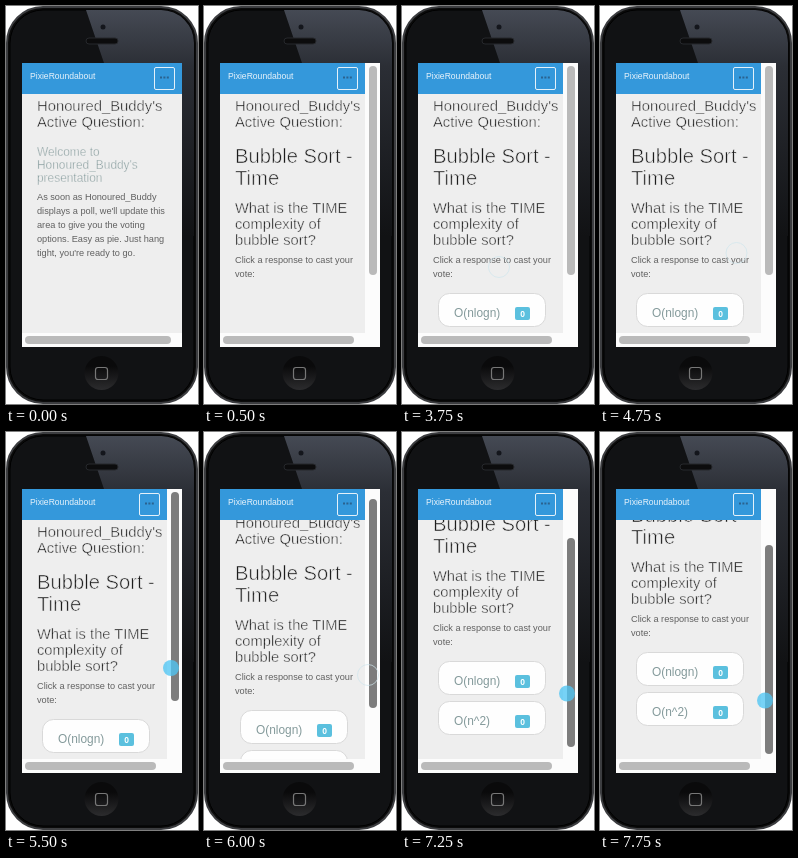
Animation, 192 px wide and 398 px high, one loop 8000 ms. Source, as an HTML page:

```html
<!DOCTYPE html>
<html lang="en">
<head>
<meta charset="utf-8">
<title>Phone poll</title>
<style>
  html, body { margin: 0; width: 100%; height: 100%; overflow: hidden; background: #fff; }
  svg { display: block; }
  text { font-family: "Liberation Sans", Arial, sans-serif; fill: #1c1c1c; white-space: pre; }
  /* a thin outline in the paper colour makes the letters light */
  .thin { stroke: #eee; stroke-width: .033em; }
  .soft { fill: #849a9b; }
  .body { fill: #606060; }
</style>
</head>
<body>
<svg width="192" height="398" viewBox="0 0 192 398">
  <defs>
    <linearGradient id="sheen" x1="0" y1="0" x2="0" y2="1">
      <stop offset="0" stop-color="#454a54"/>
      <stop offset=".25" stop-color="#2b2e35"/>
      <stop offset="1" stop-color="#111214"/>
    </linearGradient>
    <linearGradient id="button" x1="0" y1="0" x2="0" y2="1">
      <stop offset=".3" stop-color="#0a0a0b"/>
      <stop offset="1" stop-color="#2c2c2e"/>
    </linearGradient>
    <clipPath id="shell"><rect x="4" y="4" width="184" height="390" rx="33"/></clipPath>
    <clipPath id="view"><rect id="viewBox" x="16" y="88" height="239"/></clipPath>
  </defs>

  <rect x="1" y="1" width="190" height="396" rx="36" fill="#0b0b0b" stroke="#3c3d40" stroke-width="2"/>
  <rect x="4" y="4" width="184" height="390" rx="33" fill="#111214" stroke="#000"/>
  <path d="M80 4H188V230H140L98 57Z" fill="url(#sheen)" clip-path="url(#shell)"/>
  <rect x="80" y="32" width="32" height="6" rx="3" fill="#0c0c0d" stroke="#26282c"/>
  <circle cx="97" cy="21" r="2.5" fill="#14161c"/>
  <circle cx="95.5" cy="367" r="17" fill="url(#button)"/>
  <rect x="89.5" y="361.5" width="12" height="12" rx="2.5" fill="none" stroke="#777" stroke-width="1.2"/>

  <rect x="16" y="57" width="160" height="284" fill="#fcfcfc"/>
  <rect id="paper" x="16" y="57" height="270" fill="#eee"/>
  <g clip-path="url(#view)">
    <g id="page">
      <g id="title"></g>
      <g id="waiting"></g>
      <g id="poll"></g>
      <g id="options"></g>
    </g>
  </g>

  <rect id="bar" x="16" y="57" height="31" fill="#3498db"/>
  <text x="24" y="73" font-size="8.6" style="fill:#e8f3fb">PixieRoundabout</text>
  <g id="menu">
    <rect x="133.5" y="61.5" width="20" height="22" rx="1.5" fill="none" stroke="#e4f1fa"/>
    <path d="M139 71.5h9" stroke="#2a628f" stroke-width="2" stroke-dasharray="2 1.4"/>
  </g>

  <rect id="across" x="19" y="330" height="8" rx="4" fill="#bababa"/>
  <rect id="down" x="165" width="8" height="209" rx="4"/>
  <circle id="touch"/>
</svg>
<script>
const $ = id => document.getElementById(id);
const set = (id, attrs) => {
  for (const k in attrs) $(id).setAttribute(k, attrs[k]);
};
const show = (id, on) => set(id, { visibility: on ? "visible" : "hidden" });

const lines = (id, size, y, pitch, cls, rows) => {
  $(id).innerHTML += rows.map((row, i) =>
    `<text x="31" y="${y + i * pitch}" font-size="${size}" class="${cls}">${row}</text>`).join("");
};

lines("title", 14.8, 105, 16, "thin", ["Honoured_Buddy's", "Active Question:"]);
lines("waiting", 11.9, 150, 13, "thin soft", ["Welcome to", "Honoured_Buddy's", "presentation"]);
lines("waiting", 9.2, 194, 14, "body", [
  "As soon as Honoured_Buddy",
  "displays a poll, we'll update this",
  "area to give you the voting",
  "options. Easy as pie. Just hang",
  "tight, you're ready to go."
]);
lines("poll", 20.2, 157, 22, "thin", ["Bubble Sort -", "Time"]);
lines("poll", 14.7, 207, 16, "thin", ["What is the TIME", "complexity of", "bubble sort?"]);
lines("poll", 9.2, 257, 14, "body", ["Click a response to cast your", "vote:"]);

$("options").innerHTML = ["O(nlogn)", "O(n^2)"].map((label, i) => `
  <g transform="translate(0 ${i * 40})">
    <rect x="36.5" y="287.5" width="107" height="33" rx="11" fill="#fefefe" stroke="#d9d9d9"/>
    <text x="52" y="311" font-size="11.9" class="soft">${label}</text>
    <rect x="113" y="301" width="15" height="13" rx="2" fill="#5bc0de"/>
    <text x="120.5" y="310.5" font-size="8.5" font-weight="bold" text-anchor="middle" style="fill:#fff">0</text>
  </g>`).join("");

const STEP = 250, LOOP = 8000;

// touch positions per step from 2500 ms: x, y, 1 when only a faint ring
const touches = [
  [164, 284], [96, 247], [95, 246], [92, 265, 1], [91, 266, 1], [97, 261, 1],
  [112, 250, 1], [112, 250, 1], [112, 250, 1], [136.5, 247, 1], [154, 251],
  [165, 237], [165, 236], [164, 235, 1], [164, 243, 1], [166, 240], [168, 241]
];
// scroll thumb positions per step from 6000 ms
const thumbs = [67, 71, 85, 93, 105, 106, 108, 113];

function draw(t) {
  const n = Math.floor(t / STEP);
  const polling = n >= 2;
  const width = polling ? 145 : 160;
  const thumb = thumbs[n - 24] || 60;
  const scroll = Math.round((thumb - 60) * 1.265);

  for (const id of ["paper", "bar", "viewBox"]) set(id, { width });
  set("across", { width: width - 14 });
  set("menu", { transform: `translate(${width - 145} 0)` });
  show("waiting", !polling);
  show("poll", polling);
  show("options", n >= 6);
  show("down", polling);
  set("down", { y: thumb, fill: n >= 21 ? "#7d7d7d" : "#bababa" });
  set("page", { transform: `translate(0 ${-scroll})` });

  show("touch", n >= 10);
  if (n >= 10) {
    const [cx, cy, ring] = touches[n - 10] || [165, thumb + 155.5];
    set("touch", {
      cx, cy,
      r: ring ? 10.5 : 8,
      fill: ring ? "none" : "#4fc5f3",
      stroke: ring ? "#cfe6ed" : "none",
      opacity: ring ? .7 : .78
    });
  }
}

const start = performance.now();
(function tick() {
  draw((performance.now() - start) % LOOP);
  requestAnimationFrame(tick);
})();
</script>
</body>
</html>
```
